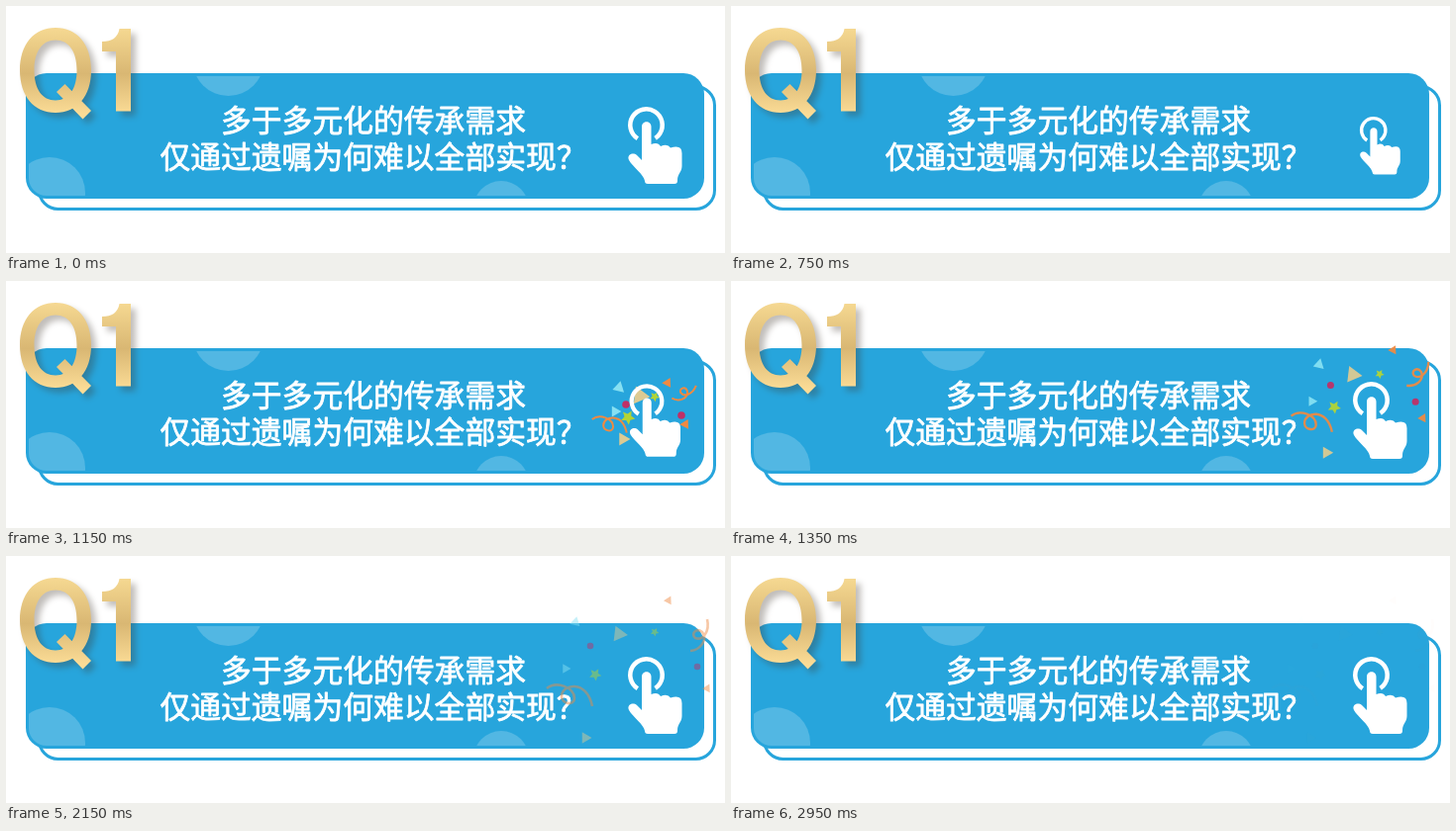
Recreate the animation shown at these times as an HTML page with a canvas. Size 726 by 250 pixels, loop 3 s.

```html
<!DOCTYPE html>
<html lang="zh-CN">
<head>
<meta charset="utf-8">
<style>
html, body { margin: 0; width: 726px; height: 250px; overflow: hidden; background: #fff; }
canvas { display: block; }
</style>
</head>
<body>
<canvas id="stage" width="726" height="250" role="img" aria-label="Q1 多于多元化的传承需求 仅通过遗嘱为何难以全部实现？"></canvas>
<script>
const ctx = document.getElementById('stage').getContext('2d');
const LOOP = 3000, STEP = 50;
const BLUE = '#27a5dc', PALE = '#52b7e3';
const CORAL = '#ef8a42', CYAN = '#86e0f2', PLUM = '#bf2f66', LIME = '#b2d435', SAND = '#dcca92';

const clamp = v => Math.max(0, Math.min(1, v));
const mix = (a, b, k) => a + (b - a) * k;

const coils = {
  coilL: new Path2D('M-24 -4C-14 -12 4 -5 4 6C4 14 -9 12 -9 4C-9 -8 16 -14 22 14'),
  coilR: new Path2D('M9 -19C12 -6 4 3 -3 0C-8 -4 -2 -11 4 -6C10 2 2 12 -8 13')
};
const hand = new Path2D(
  'M642 122C642 115.500 651.500 115.500 651.500 122V140Q658 137 661 142Q668 139 671 143.500' +
  'Q682.500 140 682.500 149V162C682.500 168 678 170 678 176V177Q678 180 675 180H648' +
  'Q645 180 645 177C644 170.500 633 163 629 156C626.500 150.500 633 147.500 637 151L642 156Z');

// Display lettering: ring of the Q, its tail, and the 1 with a flat flag.
const letterQ = new Path2D(
  'M50 22C72 22 86 39 86 65C86 91 72 108 50 108C28 108 14 91 14 65C14 39 28 22 50 22Z' +
  'M50 34.500C36.500 34.500 28.500 46 28.500 65C28.500 84 36.500 95.500 50 95.500' +
  'C63.500 95.500 71.500 84 71.500 65C71.500 46 63.500 34.500 50 34.500Z');
const badge = new Path2D('M51 87L59.500 79L86 106L77.500 114.500Z');
badge.addPath(letterQ);
badge.addPath(new Path2D('M126 23V106.500H111V46H97V36C107 36 113 32 114.500 23Z'));

// kind, colour, size, angle, early x/y, settled x/y, extra early turn
const bits = [
  ['tri', CORAL, 5, 3.1, 668, 103, 669, 45],
  ['tri', CYAN, 6, -1.35, 619, 108, 575, 67],
  ['tri', SAND, 9, .12, 640, 116, 619, 79],
  ['star', LIME, 4.5, .2, 655, 117, 655, 77],
  ['dot', PLUM, 3.3, 0, 626, 125, 590, 91],
  ['star', LIME, 6.5, .2, 628, 138, 595, 120],
  ['tri', CYAN, 5.5, 0, 615, 132, 565, 114],
  ['dot', PLUM, 3.3, 0, 682, 136, 698, 112],
  ['tri', CORAL, 5, 3.1, 686, 145, 708, 134],
  ['tri', SAND, 6.5, 0, 623, 160, 585, 184],
  ['coilL', CORAL, 1, 0, 610, 143, 570, 138],
  ['coilR', CORAL, 1, 0, 683, 114, 699, 83, .6]
];

function disc(x, y, r) {
  ctx.beginPath();
  ctx.arc(x, y, r, 0, Math.PI * 2);
  ctx.fill();
}

function polygon(radii) {
  ctx.beginPath();
  radii.forEach((r, i) => {
    const a = i * 2 * Math.PI / radii.length;
    ctx.lineTo(r * Math.cos(a), r * Math.sin(a));
  });
  ctx.fill();
}

function rounded(x, y, w, h, r) {
  ctx.beginPath();
  ctx.roundRect(x, y, w, h, r);
}

function drawCard() {
  ctx.strokeStyle = BLUE;
  ctx.lineWidth = 3;
  rounded(33.5, 81.5, 682, 124, 19);
  ctx.stroke();
  ctx.fillStyle = BLUE;
  rounded(20, 68, 685, 127, 21);
  ctx.fill();
  ctx.save();
  rounded(23, 71, 679, 121, 18);
  ctx.clip();
  ctx.fillStyle = PALE;
  disc(224.5, 55, 36);
  disc(44, 189, 36);
  disc(500, 205, 28);
  ctx.restore();
}

function drawBadge() {
  ctx.save();
  const gold = ctx.createLinearGradient(0, 23, 0, 114);
  gold.addColorStop(0, '#f5d891');
  gold.addColorStop(.5, '#d9b773');
  gold.addColorStop(.95, '#fbdc96');
  ctx.fillStyle = gold;
  ctx.shadowColor = 'rgba(60,50,40,.32)';
  ctx.shadowBlur = 6;
  ctx.shadowOffsetX = 5;
  ctx.shadowOffsetY = 5;
  ctx.fill(badge);
  ctx.restore();
}

function drawTitle() {
  ctx.fillStyle = ctx.strokeStyle = '#fff';
  ctx.lineWidth = .8;
  ctx.lineJoin = 'round';
  ctx.font = '500 30.8px "Noto Sans CJK SC", "Noto Sans CJK", sans-serif';
  ctx.textAlign = 'center';
  [['多于多元化的传承需求', 126.5], ['仅通过遗嘱为何难以全部实现？', 163.5]].forEach(([line, y]) => {
    ctx.fillText(line, 371, y);
    ctx.strokeText(line, 371, y);
  });
}

function drawBit([kind, color, size, angle, x0, y0, x1, y1, turn = 0], k) {
  const coil = coils[kind];
  const zoom = mix(coil ? .76 : 1.15, 1, k);
  ctx.save();
  ctx.translate(mix(x0, x1, k), mix(y0, y1, k));
  ctx.rotate(angle + turn * (1 - k));
  ctx.scale(zoom, zoom);
  ctx.fillStyle = ctx.strokeStyle = color;
  ctx.lineWidth = 2.6;
  if (coil) ctx.stroke(coil);
  else if (kind === 'dot') disc(0, 0, size);
  else if (kind === 'tri') polygon([size, size, size]);
  else polygon(Array.from({ length: 10 }, (_, i) => i % 2 ? size * .48 : size));
  ctx.restore();
}

function drawConfetti(t) {
  if (t <= 1000) return;
  const k = Math.min(1, (t - 1150) / 350);
  ctx.save();
  ctx.globalAlpha = clamp((t - 1000) / 100) * clamp((2980 - t) / 1730);
  bits.forEach(b => drawBit(b, k));
  ctx.restore();
}

function drawHand(t) {
  const s = t < 1000 ? 1 - t / 3000 : mix(2 / 3, 1, clamp((t - 1000) / 180));
  ctx.save();
  ctx.translate(655.5, 141.5);
  ctx.scale(s, s);
  ctx.translate(-655.5, -141.5);
  ctx.strokeStyle = ctx.fillStyle = '#fff';
  ctx.lineWidth = 4.5;
  ctx.beginPath();
  ctx.arc(646.5, 120.5, 16.2, Math.PI * .68, Math.PI * 2.31);
  ctx.stroke();
  ctx.fill(hand);
  ctx.restore();
}

function frame(now) {
  const t = Math.floor((now % LOOP) / STEP) * STEP;
  ctx.fillStyle = '#fff';
  ctx.fillRect(0, 0, 726, 250);
  drawCard();
  drawBadge();
  drawTitle();
  drawConfetti(t);
  drawHand(t);
}

let start;
function tick(now) {
  if (start === undefined) start = now;
  frame(now - start);
  requestAnimationFrame(tick);
}
frame(0);
requestAnimationFrame(tick);
</script>
</body>
</html>
```
